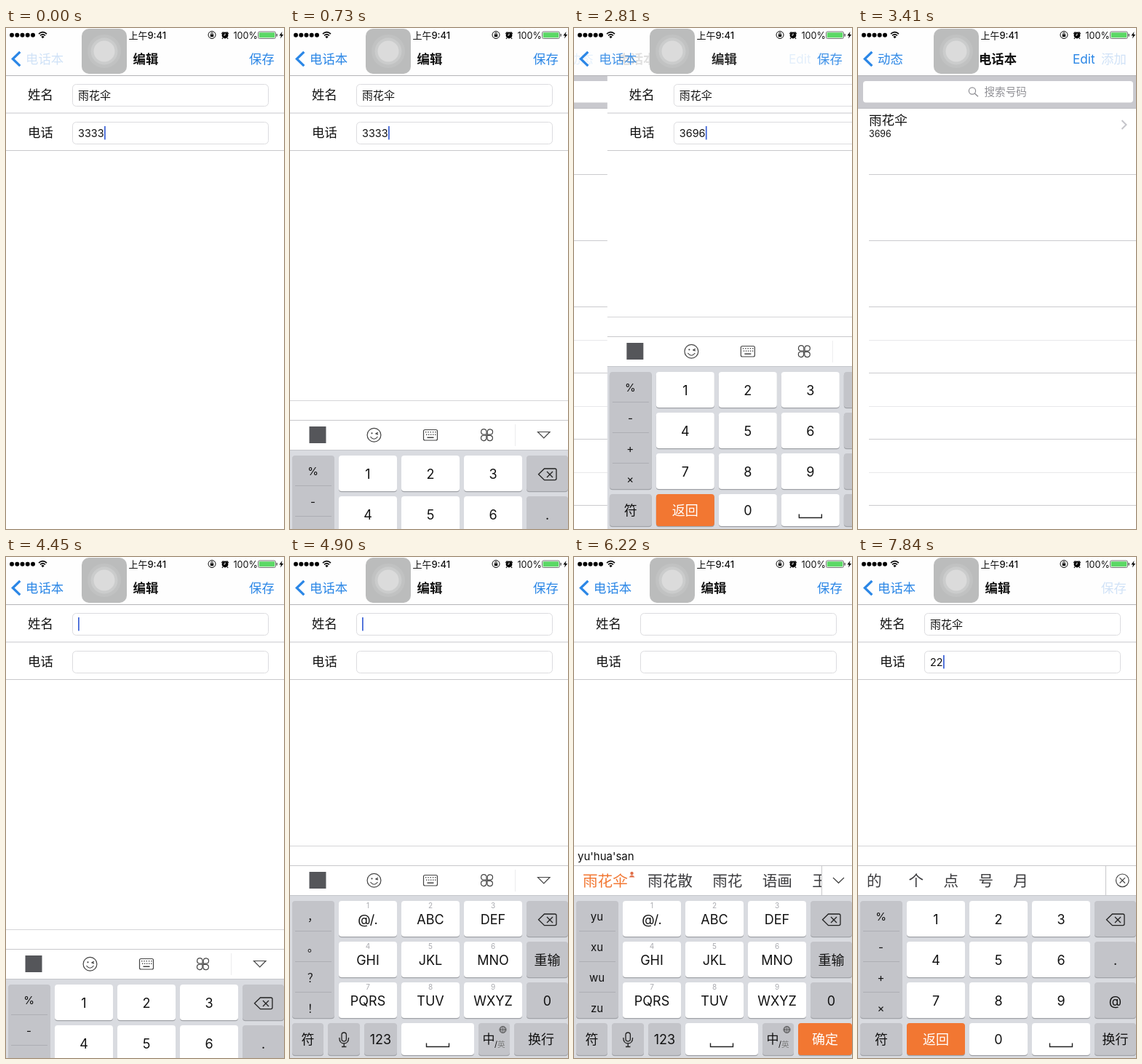
An HTML page that plays this animation: 382x689 px, repeating every 7.99 s.

```html
<!DOCTYPE html>
<html lang="zh">
<head>
<meta charset="utf-8">
<title>Phone book</title>
<style>
html, body { margin: 0; width: 100%; height: 100%; overflow: hidden; background: #fff; }
svg { display: block; width: 100%; height: 100%; font-family: Inter, "Noto Sans CJK SC", "Noto Sans CJK", sans-serif; }
</style>
</head>
<body>
<svg id="stage" viewBox="0 0 382 689"></svg>
<script>
const LOOP = 7990, FIRST = 436, TICK = 148;
const BLUE = '#2a86e6', PALE = '#d0e2f7', INK = '#111', GREY = '#c3c4c9', ORANGE = '#f27732';
const NAME = '雨花伞', OLD_PHONE = '3333', NEW_PHONE = '3696';

// Drawing helpers; text is placed by its vertical centre.
const text = (x, cy, size, str, { fill = INK, anchor = 'start', weight = 400 } = {}) =>
  `<text x="${x}" y="${cy + size * 0.37}" font-size="${size}" fill="${fill}" text-anchor="${anchor}" font-weight="${weight}">${str}</text>`;
const mid = (x, cy, size, str, opts) => text(x, cy, size, str, { ...opts, anchor: 'middle' });
const rect = (x, y, w, h, fill, r = 0, extra = '') =>
  `<rect x="${x}" y="${y}" width="${w}" height="${h}" fill="${fill}" rx="${r}" ${extra}/>`;
const circle = (x, y, r, fill, extra = '') => `<circle cx="${x}" cy="${y}" r="${r}" fill="${fill}" ${extra}/>`;
const line = (d, stroke = '#444', width = 1.2) =>
  `<path d="${d}" fill="none" stroke="${stroke}" stroke-width="${width}"/>`;
const ring = (x, y, r, width = 1.2, stroke = '#444') =>
  circle(x, y, r, 'none', `stroke="${stroke}" stroke-width="${width}"`);
const group = (x, y, body, opacity = 1) =>
  `<g transform="translate(${x} ${y})" opacity="${opacity}">${body}</g>`;
const rule = (y, color = '#c8c8cb', x = 0) => rect(x, y, 382 - x, 1, color);

function statusBar() {
  return [8, 15.3, 22.5, 29.7, 37].map(x => circle(x, 9.8, 3, '#000')).join('') +
    line('M45 8.2Q50.5 3.2 56 8.2M47 10.4Q50.5 7.3 54 10.4', '#000', 1.6) +
    '<path d="M48.3 12Q50.5 10 52.7 12L50.5 14.2z"/>' +
    mid(194.3, 10, 13, '上午9:41', { weight: 500 }) +
    ring(283, 9.5, 5, 1, '#000') + rect(280.8, 8.8, 4.4, 3.4, '#000') + line('M281.8 9V7.6a1.2 1.2 0 0 1 2.4 0V9', '#000', 0.9) +
    circle(301, 10, 4.4, '#000') + line('M301 7.3V10H299', '#fff', 0.9) +
    line('M296.3 8L298.6 5.4M303.4 5.4L305.7 8M298 13.5L297 15M304 13.5L305 15', '#000', 1.3) +
    text(312.5, 10, 12.6, '100%') +
    rect(346.5, 5, 24, 9.5, 'none', 2, 'stroke="#555" stroke-width=".8"') +
    rect(347.7, 6.2, 21.6, 7.1, '#5bd865', 1) + rect(371.5, 8, 1.4, 3.6, '#555') +
    '<path d="M379.5 5L375.5 10.4H378L377 14.6L381.2 9H378.6z"/>';
}

function assistive() {
  return rect(104, 1, 62, 62, '#bbbcbc', 10) + circle(135, 32, 23, '#c1c2c2') +
    circle(135, 32, 18.5, '#cbcccc') + circle(135, 32, 14.5, '#dbdbdb');
}

function navBar({ list, press }) {
  const edit = 1 - list;
  const tone = key => ({ fill: press === key ? PALE : BLUE });
  return rect(0, 0, 382, 65, '#fefefe') + rule(65, '#b4b4b7') +
    line('M19.3 32.8L9.3 42.5L19.3 52.2', BLUE, 3.2) +
    group(list * 120, 0, mid(192, 42.5, 17.4, '编辑', { weight: 600 }), edit) +
    group(list * 60, 0, text(27, 42.5, 17.4, '电话本', tone()), edit) +
    group(0, 0, text(334, 42.5, 17.4, '保存', tone('save')), edit) +
    group(-edit * 120, 0, mid(192, 42.5, 17.4, '电话本', { weight: 600 }), list) +
    group(-edit * 40, 0, text(27, 42.5, 17.4, '动态', tone()), list) +
    group(0, 0, text(295, 42.5, 17.2, 'Edit', tone()) + text(334, 42.5, 17.4, '添加', tone('add')), list);
}

function listPage() {
  return rect(0, 66, 382, 44, '#c9c9ce') + rule(110, '#bebec2') +
    rect(7, 73, 371, 29.5, '#fff', 4) + ring(157, 86.5, 4.6, 1.2, '#8e8e93') +
    line('M160.4 90L165 94.3', '#8e8e93', 1.4) +
    text(173.5, 87.5, 14.6, '搜索号码', { fill: '#929297' }) +
    text(15, 126.5, 17.6, NAME) + text(15, 145, 12.4, NEW_PHONE) +
    line('M362.5 127L368.5 133L362.5 139', '#c5c5ca', 2) +
    [201, 292, 383, 474, 565, 656].map(y => rule(y, '#cbcbce', 15)).join('') +
    [429, 520, 611].map(y => rule(y, '#e8e8ea', 15)).join('');
}

function editPage(s) {
  const field = (label, y, value, step, size) =>
    text(30, y + 15, 17.4, label) +
    rect(91.5, y + 0.5, 269, 30, '#fff', 5, 'stroke="#dcdcdf"') +
    text(99, y + 15.5, size, value) +
    (s.focus === label && !s.pinyin ? rect(99 + value.length * step, y + 6, 1.8, 18.5, '#4468d8') : '');
  return rect(0, 66, 382, 623, '#fff') + rule(116.5) + rule(168) +
    field('姓名', 77, s.name, 15, 15) + field('电话', 129, s.phone, 9, 14.4) +
    group(0, s.rise, keyboard(s));
}

function key(x, y, w, h, label, fill, opts) {
  return rect(x, y + 1.2, w, h, '#a0a2a7', 4) + rect(x, y, w, h, fill, 4) +
    (label ? mid(x + w / 2, y + h / 2 + 0.5, 18, label, opts) : '');
}

function toolbar() {
  const petal = a => `<path transform="rotate(${a} 270.5 444.7)" d="M270 444H265.5A3.7 3.7 0 1 1 270 440z" fill="none" stroke="#444" stroke-width="1.2"/>`;
  let dots = '';
  for (let i = 0; i < 5; i++) dots += rect(186 + i * 3.3, 440, 1.4, 1.4, '#444') + rect(187 + i * 3, 443.5, 1.4, 1.4, '#444');
  return rect(26.5, 433, 23, 23, '#55565a') +
    ring(115.5, 444.8, 9.4) + line('M110.5 447Q115.5 453.5 120.5 447M117.5 442.8L121 441.4M117.5 442.8L121 443.8') + circle(112.5, 442.3, 1.1, '#444') +
    rect(183.5, 437.5, 19, 14.5, 'none', 2, 'stroke="#444" stroke-width="1.2"') + dots + rect(188.5, 447.5, 9, 1.5, '#444') +
    [0, 90, 180, 270].map(petal).join('') +
    rect(309, 430, 1, 30, '#ececee') + line('M340.5 440.5H357L348.8 449z');
}

function candidates({ words, pinyin }) {
  let x = 12, body = '';
  words.forEach((word, i) => {
    body += text(x, 445, 20.6, word, { fill: pinyin && !i ? ORANGE : '#3c3c3f' });
    x += word.length * 20.6 + (!pinyin && !i ? 37 : 27.3);
  });
  if (words[0] === NAME) body += circle(79.5, 435, 2.2, '#e0704a') + '<path d="M75.5 440.5Q79.5 434.5 83.5 440.5z" fill="#e0704a"/>';
  return body + rect(340, 425, 42, 40, '#fff') + rect(340, 425, 1, 40, '#c8c8cb') +
    (pinyin ? line('M356 441L363.5 448.3L371 441') : ring(363.3, 444.8, 8.8) + line('M359.6 441.1L367 448.5M367 441.1L359.6 448.5'));
}

function keyboard(s) {
  const num = s.kb === 'num', cols = [67, 153, 239], rows = [473, 529, 585];
  const letters = ['@/.', 'ABC', 'DEF', 'GHI', 'JKL', 'MNO', 'PQRS', 'TUV', 'WXYZ'];
  const space = x => line(`M${x - 15.5} 668.5V673.5H${x + 15.5}V668.5`, '#222', 1.4);
  let out = rect(0, 397, 382, 68, '#fff') + rule(397, '#d5d5d8') + rule(424) +
    rect(0, 465, 382, 224, '#d9dbe0') + rule(465, '#c4c6cb');
  if (s.pinyin) out += text(5, 411, 15, s.pinyin);
  out += s.words.length ? candidates(s) : toolbar();

  out += key(3, 473, 58, 161, '', GREY);
  const side = num ? ['%', '-', '+', '×'] : s.pinyin ? ['yu', 'xu', 'wu', 'zu'] : ['，', '。', '？', '！'];
  side.forEach((label, i) => {
    out += mid(31.5, 494 + i * 42, 15, label);
    if (i) out += rect(7, 472 + i * 42, 50, 1, '#adaeb4');
  });

  for (let i = 0; i < 9; i++) {
    const x = cols[i % 3], y = rows[Math.floor(i / 3)];
    out += key(x, y, 80, 49, num ? i + 1 : letters[i], s.press === i + 1 ? '#b3b4b9' : '#fff');
    if (!num) out += mid(x + 40, y + 6.5, 10, i + 1, { fill: '#aaabb0' });
  }
  const erase = s.press === 'erase' ? '#fff' : GREY;
  out += key(325, 473, 57, 49, '', erase) +
    line('M341.5 498.8L349.5 491H364Q366 491 366 493V504.6Q366 506.6 364 506.6H349.5zM353 495L361 503M361 495L353 503', '#222', 1.3) +
    key(325, 529, 57, 49, num ? '.' : '重输', GREY) + key(325, 585, 57, 49, num ? '@' : '0', GREY);

  if (num) return out + key(3, 641, 58, 44, '符', GREY) +
    key(67, 641, 80, 44, '返回', ORANGE, { fill: '#fff' }) + key(153, 641, 80, 44, '0', '#fff') +
    key(239, 641, 80, 44, '', '#fff') + space(279) + key(325, 641, 57, 44, '换行', GREY);

  return out + key(3, 641, 43, 44, '符', GREY) + key(52, 641, 44, 44, '', GREY) +
    rect(71, 654, 6.4, 12, 'none', 3.2, 'stroke="#222" stroke-width="1.3"') +
    line('M67.8 661Q67.8 669 74.2 669Q80.6 669 80.6 661M74.2 669V673.5M71 673.5H77.4', '#222', 1.3) +
    key(102, 641, 45, 44, '123', GREY) + key(153, 641, 100, 44, '', '#fff') + space(203) +
    key(259, 641, 43, 44, '', GREY) + mid(273, 663, 17, '中') + mid(283, 670, 11, '/') + mid(290.3, 670, 10.5, '英', { fill: '#777' }) +
    ring(292.5, 650, 4.5, 0.9) + line('M288 650H297M292.5 645.5V654.5M290.5 646Q288.8 650 290.5 654M294.5 646Q296.2 650 294.5 654', '#444', 0.8) +
    (s.pinyin ? key(308, 641, 74, 44, '确定', ORANGE, { fill: '#fff' }) : key(308, 641, 74, 44, '换行', GREY));
}

// Changes by tick; a pressed key lasts one tick, the rest stays until changed.
const start = { list: 0, rise: 292, kb: 'num', focus: '电话', name: NAME, phone: OLD_PHONE, pinyin: '', words: [] };
const steps = {
  0: { rise: 245 }, 1: { rise: 115 }, 2: { rise: 20 }, 3: { rise: 0 },
  4: { press: 'erase', phone: '333' }, 5: { press: 'erase', phone: '33' }, 6: { press: 'erase', phone: '3' },
  9: { press: 6 }, 10: { phone: '36' }, 11: { press: 9 }, 12: { phone: '369' }, 13: { press: 6 }, 14: { phone: NEW_PHONE },
  15: { press: 'save' }, 16: { list: 0.12 }, 17: { list: 0.6 }, 18: { list: 0.93 }, 19: { list: 1 },
  20: { press: 'add' }, 21: { list: 0.6, name: '', phone: '', focus: '', rise: 292 },
  22: { list: 0.15 }, 23: { list: 0.02 }, 24: { list: 0 },
  26: { focus: '姓名', rise: 245 }, 27: { rise: 115 }, 28: { rise: 20 }, 29: { rise: 0 }, 30: { kb: 'abc' },
  40: { name: NAME, pinyin: '', words: ['的', '和', '是', '在', '了'] },
  42: { focus: '电话', words: [] }, 43: { kb: 'num' },
  44: { press: 2 }, 45: { phone: '2', words: ['的', '个', '点', '号', '月'] },
  47: { press: 2 }, 48: { phone: '22' }, 50: { press: 'save' }, 51: { press: 'save' }
};
[9, 8, 4, 8, 2, 7, 2, 6].forEach((press, i) => {
  const pinyin = ['yu', 'hua', 'san'].join('').slice(0, i + 1).replace(/^(yu)(?=.)/, "$1'").replace(/(hua)(?=.)/, "$1'");
  const words = i < 2 ? ['与', '于', '雨', '玉', '语'] : i < 5 ? ['雨花', '语画', '雨', '玉', '鱼'] : [NAME, '雨花散', '雨花', '语画', '玉'];
  steps[31 + i] = { press, pinyin, words };
});

function stateAt(tick) {
  const s = { ...start };
  for (let i = 0; i <= tick; i++) Object.assign(s, { press: null }, steps[i]);
  return s;
}

const stage = document.getElementById('stage');
function draw(tick) {
  const s = stateAt(tick);
  stage.innerHTML = rect(0, 0, 382, 689, '#fff') +
    (s.list ? group((s.list - 1) * 115, 0, listPage()) : '') +
    (s.list < 1 ? group(s.list * 382, 0, editPage(s)) : '') +
    navBar(s) + statusBar() + assistive();
}

const begin = performance.now();
let shown = null;
function frame() {
  const t = (performance.now() - begin) % LOOP;
  const tick = Math.max(-1, Math.floor((t - FIRST) / TICK));
  if (tick !== shown) draw(shown = tick);
  requestAnimationFrame(frame);
}
frame();
</script>
</body>
</html>
```
